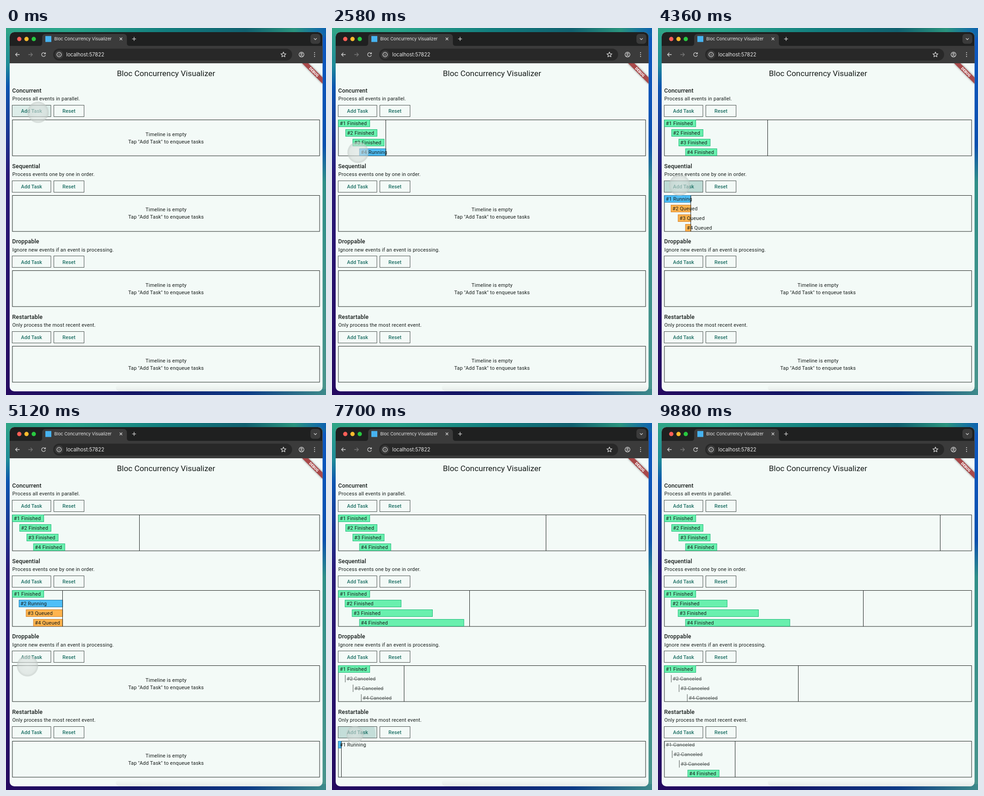
An HTML page that plays this animation: 699x801 px, repeating every 9910 ms.

```html
<!DOCTYPE html>
<html lang="en">
<head>
<meta charset="utf-8">
<title>Bloc Concurrency Visualizer</title>
<style>
html, body { margin: 0; width: 100%; height: 100%; overflow: hidden; background: #0b2f8f; }
svg { display: block; width: 699px; height: 801px; font-family: Roboto, sans-serif; }
text { white-space: pre; }
.ui { font-family: Inter, sans-serif; fill: #e9e9e9; }
.title { font-size: 17.33px; fill: #171d1b; text-anchor: middle; }
.head { font-size: 12.6px; font-weight: 500; letter-spacing: .12px; fill: #171d1b; }
.body { font-size: 11.03px; letter-spacing: .197px; fill: #171d1b; }
.mid { text-anchor: middle; }
.btn { font-size: 11.03px; font-weight: 500; letter-spacing: .08px; fill: #1d6f64; text-anchor: middle; }
.box { fill: none; stroke: #1d2220; }
.edge { fill: none; stroke: #4a514f; }
.icon { fill: none; stroke: #d2d2d2; stroke-width: 1.3; }
.gone { fill: #5b615f; text-decoration: line-through; }
</style>
</head>
<body>
<svg id="stage" viewBox="0 0 699 801"></svg>
<script>
const LOOP = 9910, SPEED = 0.0683, LEFT = 14, JOB = 1003, PITCH = 164.67;
const stage = document.getElementById('stage');

const el = (parent, tag, attrs = {}, text) => {
  const node = document.createElementNS('http://www.w3.org/2000/svg', tag);
  set(node, attrs);
  if (text) node.textContent = text;
  return parent.appendChild(node);
};
const set = (node, attrs) => {
  for (const key in attrs) node.setAttribute(key, attrs[key]);
};
const rect = (p, x, y, width, height, attrs) => el(p, 'rect', { x, y, width, height, ...attrs });
const circle = (p, cx, cy, r, attrs) => el(p, 'circle', { cx, cy, r, ...attrs });
const path = (p, d, attrs) => el(p, 'path', { d, class: 'icon', ...attrs });
const text = (p, x, y, cls, str, attrs) => el(p, 'text', { x, y, class: cls, ...attrs }, str);
const show = (node, on) => node.setAttribute('visibility', on ? 'visible' : 'hidden');
const clamp = (v, a = 0, b = 1) => Math.min(b, Math.max(a, v));

const defs = el(stage, 'defs');
function gradient(id, vertical, stops) {
  const g = el(defs, 'linearGradient', { id, x2: vertical ? 0 : 1, y2: vertical ? 1 : 0 });
  stops.forEach(([offset, color, opacity = 1]) =>
    el(g, 'stop', { offset, 'stop-color': color, 'stop-opacity': opacity }));
  return { fill: `url(#${id})` };
}

function drawDesktop() {
  rect(stage, 0, 0, 350, 801, gradient('wallLeft', true,
    [[0, '#2fa487'], [.1, '#1f8c98'], [.16, '#0d55b0'], [.4, '#2a1a78'], [1, '#250a60']]));
  rect(stage, 350, 0, 349, 801, gradient('wallRight', true,
    [[0, '#1a7f86'], [.03, '#0d58c0'], [.32, '#0b4fae'], [.42, '#2f8f87'], [1, '#4a948c']]));
  rect(stage, 0, 0, 699, 12, gradient('wallTop', false,
    [[0, '#2fa487'], [.2, '#2aa58c'], [.5, '#127d7e'], [.75, '#11606f'], [.9, '#2a947e'], [1, '#0d62b0']]));
  rect(stage, 0, 788, 699, 13, gradient('wallBase', false,
    [[0, '#250a60'], [.4, '#141565'], [.75, '#0c3a86'], [1, '#3d8a8a']]));
}

function drawBrowser() {
  rect(stage, 8, 9, 683.5, 784, { rx: 10, fill: '#f3faf7' });
  rect(stage, 240, 778, 451, 15, { rx: 9, ...gradient('floor', true, [[0, '#e6eae8', 0], [1, '#e3e7e5', .8]]) });
  path(stage, 'M8 77V19a10 10 0 0 1 10-10H681.5a10 10 0 0 1 10 10V77Z', { style: 'fill:#1f2020;stroke:none' });
  rect(stage, 8, 39, 683.5, 38, { fill: '#3b3b3b' });
  path(stage, 'M73 39q6 0 6-6V21q0-8 8-8H256q8 0 8 8V33q0 6 6 6Z', { style: 'fill:#3b3b3b;stroke:none' });
  ['#ff5f57', '#febc2e', '#28c840'].forEach((fill, i) => circle(stage, 29 + i * 15.8, 24, 4.7, { fill }));
  rect(stage, 86, 17.5, 13, 13, { fill: '#47b3f0' });
  text(stage, 105.5, 27.4, 'ui', 'Bloc Concurrency Visualizer', { 'font-size': 9.4 });
  path(stage, 'M248.3 21l5.6 5.6m0-5.6l-5.6 5.6M275.6 23.8h8.4m-4.2-4.2v8.4');
  rect(stage, 665, 13, 21.5, 21.5, { rx: 6, fill: '#3b3b3b' });
  path(stage, 'M672.6 22.4l3.1 3.1l3.1-3.1');

  rect(stage, 103, 45, 522, 26, { rx: 13, fill: '#282828' });
  path(stage, 'M29.8 58H20.8m4-4l-4 4l4 4');
  path(stage, 'M48.8 58h9m-4-4l4 4l-4 4', { opacity: .4 });
  path(stage, 'M85.2 55.2a4.2 4.2 0 1 0 .9 3.9M86.2 53.2v3.2h-3.2');
  circle(stage, 116, 58, 9.3, { fill: '#3b3b3b' });
  circle(stage, 116, 58, 4.8, { class: 'icon', 'stroke-width': 1 });
  path(stage, 'M116 57.4v3m0-5v1.1');
  text(stage, 131.5, 61.9, 'ui', 'localhost:57822', { 'font-size': 11.03 });
  const star = [...Array(10)].map((_, i) => {
    const a = i * Math.PI / 5, r = i % 2 ? 2.6 : 5.8;
    return [606 + r * Math.sin(a), 58.2 - r * Math.cos(a)];
  });
  path(stage, `M${star.join('L')}Z`, { 'stroke-linejoin': 'round' });
  circle(stage, 645.5, 58, 5.3, { class: 'icon' });
  circle(stage, 645.5, 56.4, 1.7, { class: 'icon' });
  path(stage, 'M641.8 61.7q3.7-2.8 7.4 0');
  [53.8, 58, 62.2].forEach(y => circle(stage, 674, y, 1.1, { fill: '#d2d2d2' }));
}

function drawBanner() {
  rect(el(defs, 'clipPath', { id: 'page' }), 8, 77, 683.5, 716);
  const blur = el(defs, 'filter', { id: 'blur', x: '-20%', y: '-60%', width: '140%', height: '220%' });
  el(blur, 'feGaussianBlur', { stdDeviation: 2 });
  const g = el(el(stage, 'g', { 'clip-path': 'url(#page)' }), 'g', { transform: 'translate(691.5 77) rotate(45)' });
  rect(g, -32, 22, 64, 9.5, { opacity: .5, filter: 'url(#blur)' });
  rect(g, -32, 22, 64, 9.5, { fill: '#a9494a' });
  text(g, 0, 29.6, 'mid', 'DEBUG', { fill: '#fff', 'font-size': 8.04, 'font-weight': 900 });
}

// name, description, mode, time of each tap
const lanes = [
  ['Concurrent', 'Process all events in parallel.', 'parallel', [1060, 1292, 1521, 1735]],
  ['Sequential', 'Process events one by one in order.', 'queue', [3513, 3725, 3952, 4187]],
  ['Droppable', 'Ignore new events if an event is processing.', 'drop', [5604, 5824, 6073, 6336]],
  ['Restartable', 'Only process the most recent event.', 'restart', [7612, 7861, 8088, 8359]]
].map(([name, about, mode, taps], i) => ({ name, about, mode, taps, y: i * PITCH, id: 'button' + i }));

const palette = {
  Running: ['#4fbff8', '#1c78ad'],
  Queued: ['#ffb44e', '#cf7a22'],
  Finished: ['#69f0ae', '#1fb878']
};

// Each state is [label, end of bar]
function taskState({ mode, taps }, i, t) {
  const from = mode === 'queue' ? taps[0] + i * JOB : taps[i];
  const end = from + JOB;
  if (mode === 'drop' && i > 0) return ['Canceled', from];
  if (mode === 'restart' && i < 3 && t >= taps[i + 1]) return ['Canceled', from];
  if (t < from) return ['Queued', t];
  return t < end ? ['Running', t] : ['Finished', end];
}

function buildLane(lane) {
  const y = lane.y, top = 200.5 + y;
  text(stage, 13.6, 141 + y, 'head', lane.name);
  text(stage, 13.8, 158.4 + y, 'body', lane.about);

  rect(el(defs, 'clipPath', { id: lane.id }), 13.5, 168.5 + y, 84.5, 25.3);
  const ink = el(stage, 'g', { 'clip-path': `url(#${lane.id})`, fill: '#1d7a70' });
  lane.hover = rect(ink, 13, 168 + y, 86, 27, { opacity: .1 });
  lane.ripples = lane.taps.map(() => circle(ink, 0, 0, 0));
  rect(stage, 13.5, Math.round(168 + y) + .5, 84.5, 25, { class: 'edge' });
  rect(stage, 104.5, Math.round(168 + y) + .5, 66, 25, { class: 'edge' });
  text(stage, 55.8, 185.4 + y, 'btn', 'Add Task');
  text(stage, 137.5, 185.4 + y, 'btn', 'Reset');

  const boxTop = Math.round(top - .5) + .5;
  rect(stage, 14, boxTop, 671, 78.5, { class: 'box' });
  lane.empty = el(stage, 'g');
  text(lane.empty, 349.6, 235.8 + y, 'body mid', 'Timeline is empty');
  text(lane.empty, 349.6, 251.6 + y, 'body mid', 'Tap "Add Task" to enqueue tasks');

  lane.bars = lane.taps.map((tap, i) => {
    const x = LEFT + (tap - lane.taps[0]) * SPEED, by = boxTop + i * 21;
    const g = el(stage, 'g');
    return { g, x, bar: rect(g, x, by, 0, 15), label: text(g, x + 3, by + 11.9, 'body') };
  });
  lane.line = el(stage, 'line', { y1: boxTop, y2: boxTop + 78.5, stroke: '#1d2220' });
}

// Cursor stops: time, x, y
const stops = [
  [0, 70, 184], [1100, 69, 183.5], [2100, 69, 183.5], [3000, 47, 343], [4450, 47, 343],
  [5080, 47, 530], [5180, 47, 530], [5500, 61, 513], [6650, 61, 513], [7400, 50, 680], [LOOP, 50, 680]
];
const HIDE = 8800;

function cursorAt(t) {
  const i = stops.findIndex(s => s[0] > t);
  const [t0, x0, y0] = stops[i - 1], [t1, x1, y1] = stops[i];
  const k = (t - t0) / (t1 - t0), e = k * k * (3 - 2 * k);
  return [x0 + (x1 - x0) * e, y0 + (y1 - y0) * e];
}

function buildCursor() {
  const glow = el(defs, 'radialGradient', { id: 'glow' });
  [[0, '#dfe5e3', .6], [.75, '#d3dad7', .55], [.93, '#c3cac7', .65], [1, '#bcc4c1', .3]].forEach(
    ([offset, color, opacity]) => el(glow, 'stop', { offset, 'stop-color': color, 'stop-opacity': opacity }));
  return circle(stage, 0, 0, 23.5, { fill: 'url(#glow)' });
}

function drawLane(lane, t, x, y) {
  const { taps } = lane, start = taps[0], active = t >= start;
  const over = t < HIDE && x > 13 && x < 99 && Math.abs(y - lane.y - 181) < 13;
  show(lane.hover, over);
  lane.ripples.forEach((ripple, i) => {
    const age = t - taps[i] + 48;
    const [cx, cy] = cursorAt(taps[i]);
    set(ripple, { cx, cy, r: clamp(age * .33, 0, 90), opacity: age > 0 ? .13 * clamp((550 - age) / 300) : 0 });
  });

  show(lane.empty, !active);
  show(lane.line, active);
  const now = Math.floor(LEFT + (t - start) * SPEED) + .5;
  set(lane.line, { x1: now, x2: now });

  lane.bars.forEach(({ g, x, bar, label }, i) => {
    const on = t >= taps[i];
    show(g, on);
    if (!on) return;
    const [state, end] = taskState(lane, i, t);
    const gone = state === 'Canceled';
    const [fill, stroke] = palette[state] || ['none', '#4f5553'];
    const width = gone ? .01 : Math.max(.5, LEFT + (end - start) * SPEED - x);
    set(bar, { fill, stroke, width });
    label.textContent = `#${i + 1} ${state}`;
    label.setAttribute('class', gone ? 'body gone' : 'body');
  });
}

drawDesktop();
drawBrowser();
text(stage, 349.5, 104.5, 'title', 'Bloc Concurrency Visualizer');
lanes.forEach(buildLane);
drawBanner();
const cursor = buildCursor();
const allTaps = lanes.flatMap(lane => lane.taps);

function render(t) {
  const [x, y] = cursorAt(t);
  lanes.forEach(lane => drawLane(lane, t, x, y));
  const near = Math.min(...allTaps.map(tap => Math.abs(t - tap)));
  set(cursor, { cx: x, cy: y, r: 19 + 4.5 * clamp((near - 90) / 60), opacity: clamp((HIDE + 200 - t) / 200) });
}

const begin = performance.now();
function tick() {
  render((performance.now() - begin) % LOOP);
  requestAnimationFrame(tick);
}
tick();
</script>
</body>
</html>
```
